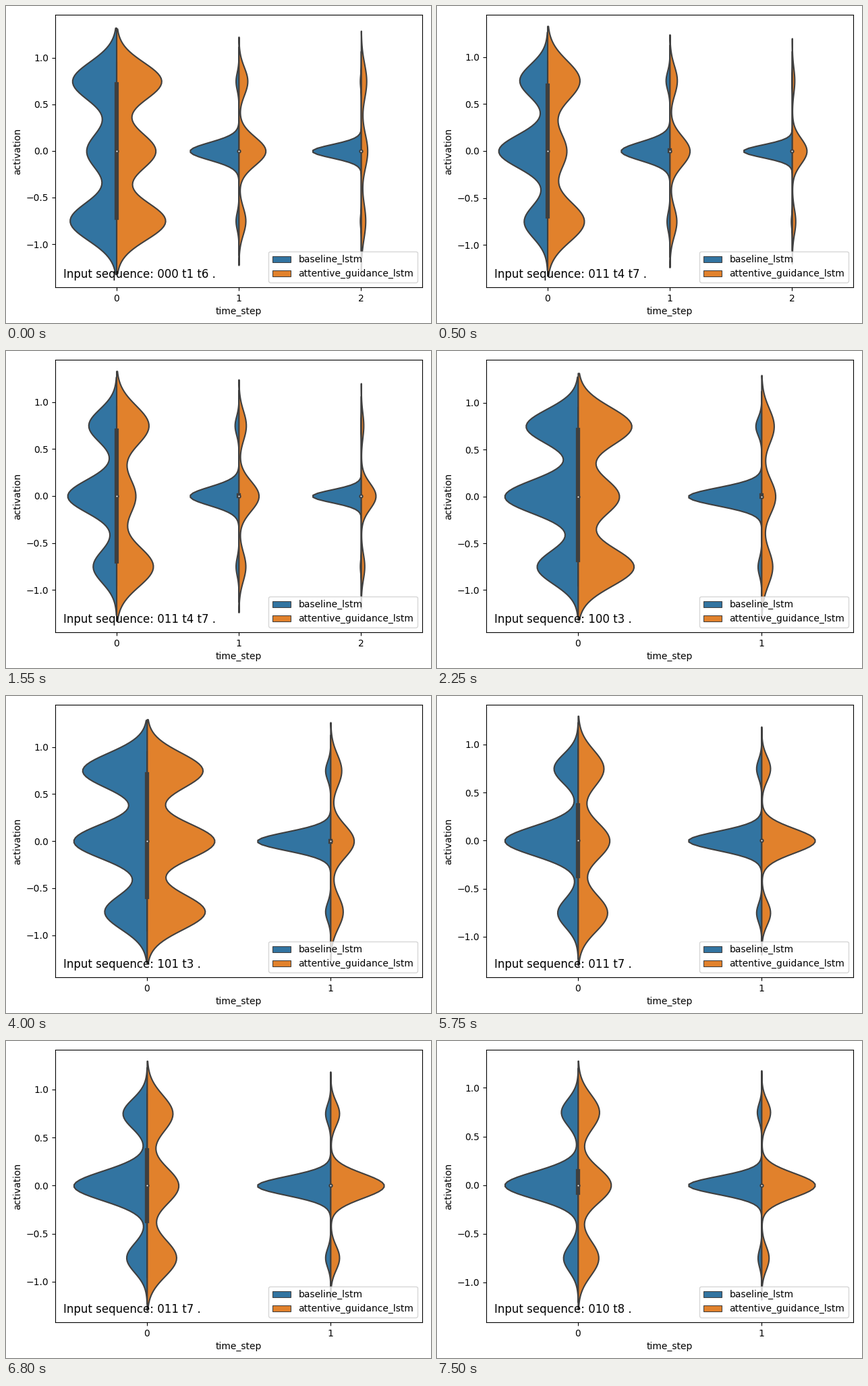
Write a matplotlib script that moves like this. It is 630 px wide and 470 px high and loops after 8000 ms.

```python
import math
import numpy as np
import matplotlib.pyplot as plt
from matplotlib.animation import FuncAnimation
from matplotlib.patches import Patch

plt.rcParams["font.family"] = "DejaVu Sans"

W, H = 630, 470
LEFT, RIGHT, TOP, BOTTOM = 72.9, 616.9, 13.4, 416.95
BLUE, ORANGE, GRAY = "#3274a1", "#e1812c", "#3f3f3f"
STEP_MS, FIRST_MS, HOLD_MS, LOOP_MS = 250, 500, 1750, 8000
OUTER = .75  # activations gather at -OUTER, 0 and OUTER

fig = plt.figure(figsize=(W / 100, H / 100), dpi=100)
ax = fig.add_axes([LEFT / W, 1 - BOTTOM / H, (RIGHT - LEFT) / W, (BOTTOM - TOP) / H])
scenes = []


def add_scene(text, ylim, *violins):
    """A violin is a (baseline, guided) pair of upper, middle and lower peak widths in percent."""
    scenes.append((text, ylim, violins))


add_scene("000 t1 t6", (-1.463, 1.46),
          ((90, 61, 95), (92, 80, 100)), ((6, 100, 6), (18, 55, 14)), ((2, 100, 2), (11, 13, 9)))
add_scene("011 t4 t7", (-1.451, 1.447),
          ((57, 100, 48), (66, 39, 75)), ((8, 100, 6), (15, 41, 14)), ((1, 100, 2), (5, 30, 7)))
add_scene("100 t3", (-1.45, 1.457),
          ((71, 100, 56), (73, 56, 76)), ((8, 100, 5), (17, 19, 15)))
add_scene("101 t3", (-1.448, 1.447),
          ((88, 100, 58), (76, 92, 79)), ((7, 100, 7), (15, 32, 17)))
add_scene("011 t7", (-1.421, 1.41),
          ((33, 100, 28), (35, 43, 40)), ((7, 100, 7), (12, 73, 12)))
add_scene("010 t8", (-1.411, 1.389),
          ((23, 100, 20), (29, 45, 28)), ((6, 100, 5), (12, 73, 10)))


def density(peaks):
    """Kernel density whose bandwidth follows the spread of the three clusters."""
    upper, middle, lower = peaks
    spread = OUTER * math.sqrt((upper + lower) / sum(peaks))
    bandwidth = .31 * spread
    sigma = math.hypot(bandwidth, .055)
    tip = 1 + 1.6 * bandwidth
    y = np.linspace(-tip, tip, 100)
    width = sum(peak * np.exp(-((y - center) / sigma) ** 2 / 2)
                for peak, center in zip(peaks, (OUTER, 0, -OUTER)))
    return y, width / 100 * .4


def quartile(share):
    """Distance from 0: jumps to the outer cluster once that holds a quarter of the data."""
    return .72 / (1 + math.exp((.243 - share) / .022))


def draw_violin(x, baseline, guided):
    for side, color, peaks in ((-1, BLUE, baseline), (1, ORANGE, guided)):
        y, width = density(peaks)
        ax.fill_betweenx(y, x, x + side * width, facecolor=color,
                         edgecolor=GRAY, linewidth=1.5)
    upper, middle, lower = np.add(baseline, guided)
    total = upper + middle + lower
    q1, q3 = -quartile(lower / total), quartile(upper / total)
    reach = 1.5 * (q3 - q1)
    ax.plot([x, x], [max(-.95, q1 - reach), min(.95, q3 + reach)], color=GRAY, lw=1.5)
    ax.plot([x, x], [q1, q3], color=GRAY, lw=4.5)
    ax.scatter(x, 0, s=9, color="white", edgecolor=GRAY, linewidth=1.5, zorder=3)


def draw(frame):
    index = max(0, 1 + (frame * STEP_MS - FIRST_MS) // HOLD_MS)
    text, ylim, violins = scenes[index]
    ax.clear()
    for x, pair in enumerate(violins):
        draw_violin(x, *pair)
    ax.set_xlim(-.5, len(violins) - .5)
    ax.set_ylim(ylim)
    ax.set_xticks(range(len(violins)))
    ax.set_yticks(np.arange(-1, 1.1, .5))
    ax.set_xlabel("time_step")
    ax.set_ylabel("activation")
    ax.text(.0224, .0353, f"Input sequence: {text} .", fontsize=12,
            transform=ax.transAxes, zorder=4)
    ax.legend(handles=[Patch(facecolor=color, edgecolor=GRAY, linewidth=.75, label=label)
                       for color, label in ((BLUE, "baseline_lstm"),
                                            (ORANGE, "attentive_guidance_lstm"))],
              loc="lower right")


anim = FuncAnimation(fig, draw, frames=LOOP_MS // STEP_MS, interval=STEP_MS,
                     init_func=lambda: draw(0), repeat=True, repeat_delay=0)
plt.show()
```
